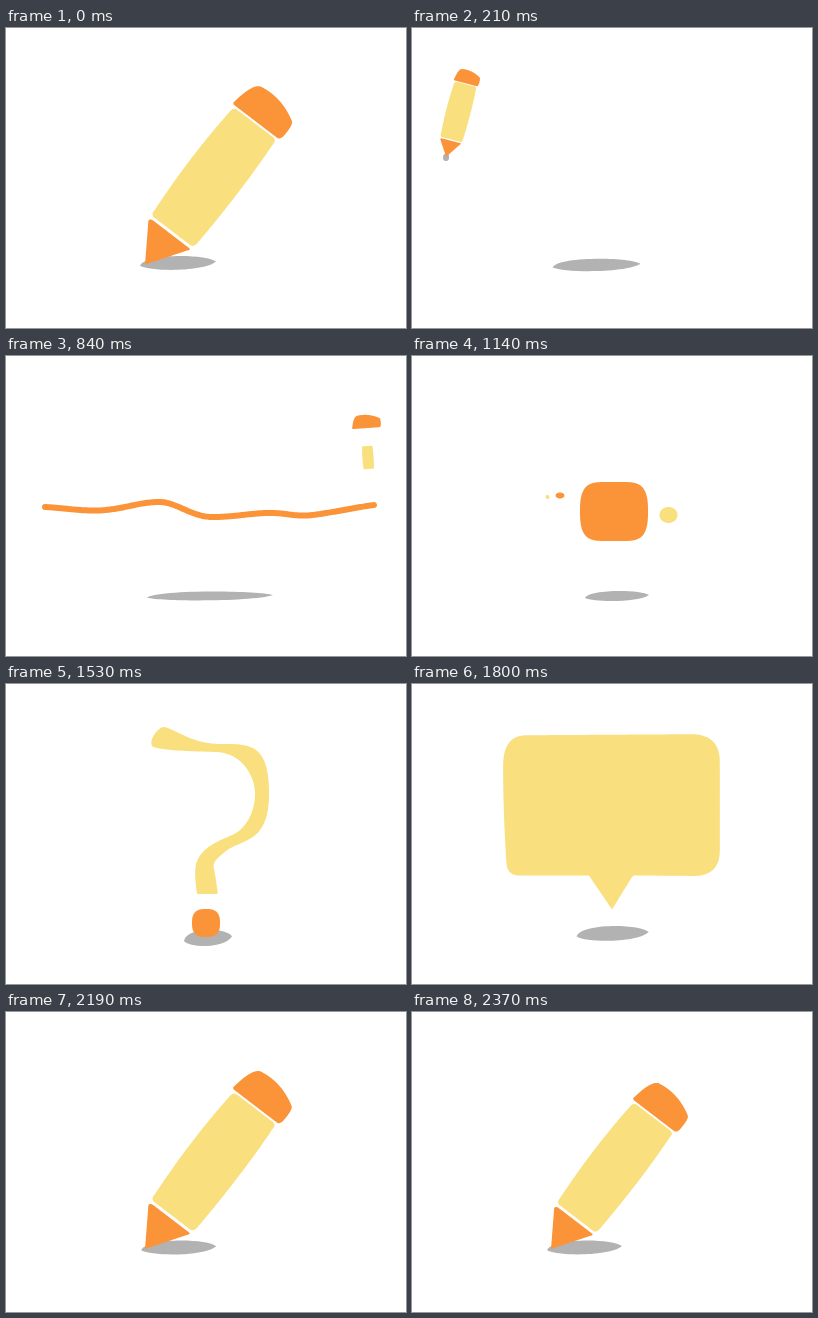
Animation, 400 px wide and 300 px high, one loop 2.4 s. Source, as an HTML page with a canvas:

```html
<!DOCTYPE html>
<html lang="en">
<head>
<meta charset="utf-8">
<title>Pencil loop</title>
<style>
  html, body { margin: 0; width: 100%; height: 100%; overflow: hidden; background: #fff; }
  canvas { display: block; width: 400px; height: 300px; }
</style>
</head>
<body>
<canvas id="stage" width="400" height="300"></canvas>
<script>
const ctx = document.getElementById('stage').getContext('2d');
const LOOP = 2400, SAMPLES = 240;
const YELLOW = '#f9df7d', ORANGE = '#fb9438', GREY = '#b2b2b2';

const mix = (a, b, u) => a + (b - a) * u;
const mixAll = (a, b, u) => a.map((v, i) => mix(v, b[i], u));
const morph = (a, b, u) => a.map((p, i) => mixAll(p, b[i], u));
const span = (t, a, b) => Math.min(1, Math.max(0, (t - a) / (b - a)));
const ease = u => u * u * (3 - 2 * u);
const inOut = u => u < .5 ? 4 * u ** 3 : 1 - 4 * (1 - u) ** 3;
const out = u => 1 - (1 - u) ** 3;
const arch = u => Math.sin(Math.PI * u);

// Evenly spaced points along a path.
function sample(d) {
  const path = document.createElementNS('http://www.w3.org/2000/svg', 'path');
  path.setAttribute('d', d);
  const step = path.getTotalLength() / SAMPLES;
  return Array.from({ length: SAMPLES + 1 }, (_, i) => {
    const p = path.getPointAtLength(i * step);
    return [p.x, p.y];
  });
}

// Point at fraction u of a sampled path.
function pointAt(pts, u) {
  const i = Math.min(SAMPLES - 1, Math.floor(u * SAMPLES));
  return mixAll(pts[i], pts[i + 1], u * SAMPLES - i);
}

// Pencil parts: tip at the origin, axis along +y.
const CONE = sample('M0,0L-24,37Q-24,40 -20,40H24Q28,40 25,37Z');
const BODY = sample('M1,43H-21Q-26,43 -25.5,49Q-30,115 -25.5,174Q-25,179 -21,179' +
  'H24Q29,179 28.5,174Q32,115 28.5,49Q28,43 24,43Z');
const ERASER = sample('M-25,181H28Q31,181 32,186Q33,200 30,203Q8,216 -15,212Q-24,211 -28,184Q-29,181 -25,181Z');

const CURL = sample('M34,130C34,119 50,109 68,109S104,118 112,140S126,191 158,191S228,172 228,148' +
  'C228,128 188,127 188,155S206,190 229,190S267,178 296.5,150');
const WAVE = sample('M39,151C59,152 80,156 100,154S135,146 153,146S185,161 207,161S245,157 263,157' +
  'S285,160 300,159.5S345,152 368,149');

// Both outlines run clockwise from the foot, so they morph cleanly.
const HOOK = sample('M201,210H191Q188,190 190,180C196,160 220,155 230,149S249,128 249,110S236,69 210,68' +
  'S160,67 147,63C141,58 152,43 158,43C170,45 185,60 215,60S263,60 263,110S235,155 220,167' +
  'S207,180 209,190L212,210Z');
const BUBBLE = sample('M200,221L179,188.5H116Q105,189 104,177Q101,130 101,84Q101,55 122,55' +
  'L272,54Q298,54 298,80V165Q298,188 276,189L219,188.5Z');

function fill(pts, color) {
  ctx.fillStyle = color;
  ctx.beginPath();
  pts.forEach(p => ctx.lineTo(...p));
  ctx.fill();
}

// Superellipse: exponents below 1 square off the sides.
function oval(x, y, rx, ry, color, px = 1, py = 1) {
  const bend = (v, p) => Math.sign(v) * Math.abs(v) ** p;
  fill(Array.from({ length: SAMPLES }, (_, i) => {
    const a = i / SAMPLES * 2 * Math.PI;
    return [x + rx * bend(Math.cos(a), px), y + ry * bend(Math.sin(a), py)];
  }), color);
}

// Pose is [tip x, tip y, degrees, width scale, length scale].
const REST = [139, 237, 37.4, 1, 1];
const DRAW = [34, 130, 14, .42, .42];
const SPLIT = [365, 148, -4, .48, .42];
const LEAN = [160, 233, 14, .8, .85];

function pencilPose(t) {
  if (t < 180) {
    const u = span(t, 0, 180), pose = mixAll(REST, DRAW, ease(u));
    pose[1] -= 20 * arch(u);
    return pose;
  }
  if (t < 2000) {
    const tip = pointAt(CURL, inOut(span(t, 180, 540)));
    return mixAll([...tip, mix(14, 19, span(t, 180, 480)), .42, .42], SPLIT, ease(span(t, 540, 720)));
  }
  const dip = 1 - .165 * arch(span(t, 2190, LOOP));
  const [x, y, deg, sx, sy] = mixAll(LEAN, REST, ease(span(t, 2040, 2190)));
  return [x, y, deg, sx * dip, sy * dip];
}

// Puts a pencil part on the stage, scaled by k about a point of the axis.
function place(pts, [x, y, deg, sx, sy], k = 1, axis = 0) {
  const c = Math.cos(deg * Math.PI / 180), s = Math.sin(deg * Math.PI / 180);
  return pts.map(p => {
    const px = p[0] * k * sx, py = mix(axis, p[1], k) * sy;
    return [x + px * c + py * s, y + px * s - py * c];
  });
}

// Keys are [time, centre x, centre y, half width, half height].
const SHADOW = [[0, 172, 235, 38, 7], [480, 202.5, 240, 52.5, 5], [840, 204, 240, 63, 4.5],
  [1140, 205, 240, 32, 5], [1530, 202, 254, 24, 8], [1980, 200, 247, 42.5, 7], [2200, 172.5, 235.5, 37.5, 7]];

function drawShadow(t) {
  const i = SHADOW.findLastIndex(key => key[0] <= t);
  const a = SHADOW[i], b = SHADOW[i + 1] || a;
  const [, x, y, rx, ry] = mixAll(a, b, ease(span(t, a[0], b[0] + 1e-6)));
  ctx.fillStyle = GREY;
  ctx.beginPath();
  ctx.moveTo(x - rx, y + .4 * ry);
  ctx.bezierCurveTo(x - .9 * rx, y - 1.4 * ry, x + .75 * rx, y - 1.35 * ry, x + rx, y - .2 * ry);
  ctx.bezierCurveTo(x + .7 * rx, y + 1.25 * ry, x - .7 * rx, y + 1.3 * ry, x - rx, y + .4 * ry);
  ctx.fill();
}

function drawLine(t) {
  if (t < 180 || t > 1110) return;
  const shrink = ease(span(t, 960, 1110)), end = inOut(span(t, 180, 540));
  const pts = morph(CURL, WAVE, out(span(t, 540, 800))).map(p => mixAll(p, [202, 156], shrink * .9));
  const tint = mixAll([178, 178, 178], [251, 148, 56], span(t, 570, 690));
  ctx.strokeStyle = `rgb(${tint.map(Math.round)})`;
  ctx.lineWidth = 6 + 34 * shrink ** 2;
  ctx.lineCap = ctx.lineJoin = 'round';
  ctx.beginPath();
  pts.slice(0, Math.ceil(end * SAMPLES)).forEach(p => ctx.lineTo(...p));
  ctx.lineTo(...pointAt(pts, end));
  ctx.stroke();
}

function drawPencil(t) {
  if (t > 1000 && t < 2090) return;
  const pose = pencilPose(t), late = t > 2000, grow = ease(span(t, 2090, 2190));
  fill(place(CONE, pose, late ? grow : 1 - span(t, 580, 720)), ORANGE);
  if (!late) fill(place(BODY, pose, 1 - span(t, 620, 990), 111), YELLOW);
  fill(place(ERASER, pose, late ? grow : 1 - span(t, 850, 1000), 197), ORANGE);
}

function drawDrops(t) {
  if (t < 1080 || t > 1260) return;
  const burst = out(span(t, 1080, 1140)), fade = 1 - span(t, 1140, 1230);
  const drop = (x, y, rx, ry, color) => oval(mix(202, x, burst), mix(156, y, burst), rx, ry, color);
  drop(135.5, 141, 2 * fade, 2 * fade, YELLOW);
  drop(148, 139.5, 4.5 * fade, 3 * fade, ORANGE);
  drop(256.5, 159 - 50 * ease(span(t, 1140, 1260)), 9 * burst, 8 * burst, YELLOW);
}

// The drum pops up, then falls and becomes the dot.
function drawDrum(t) {
  if (t < 1080 || t > 1770) return;
  const fall = span(t, 1180, 1380), size = out(span(t, 1060, 1140)) * (1 - span(t, 1650, 1770));
  oval(mix(202, 200, fall), mix(155.5, 239, fall ** 2), mix(34, 14, fall) * size, mix(29.5, 14, fall) * size,
    ORANGE, mix(.4, .72, fall), .75);
}

// Part of the hook between two heights, mirrored on both of its sides.
function hookPart(from, to) {
  return HOOK.map((_, i) => {
    const side = i / SAMPLES, u = mix(from, to, 1 - Math.abs(1 - 2 * side)) / 2;
    return pointAt(HOOK, side < .5 ? u : 1 - u);
  });
}

function drawYellow(t) {
  if (t < 1240) return;
  const grown = out(span(t, 1240, 1500));
  let shape = hookPart(mix(.5, 0, grown), mix(.54, 1, grown));
  if (t > 1650) {
    const swell = arch(span(t, 1650, 1970));
    const bubble = BUBBLE.map(([x, y]) => [mix(200, x, 1 + .1 * swell), mix(130, y, 1 + .05 * swell)]);
    shape = morph(shape, bubble, ease(span(t, 1650, 1800)));
  }
  if (t > 2030) shape = morph(shape, place(BODY, pencilPose(t)), ease(span(t, 2030, 2190)));
  fill(shape, YELLOW);
}

const start = performance.now();
function frame() {
  const t = (performance.now() - start) % LOOP;
  ctx.fillStyle = '#fff';
  ctx.fillRect(0, 0, 400, 300);
  drawShadow(t);
  drawLine(t);
  drawDrum(t);
  drawDrops(t);
  drawYellow(t);
  drawPencil(t);
  requestAnimationFrame(frame);
}
frame();
</script>
</body>
</html>
```
